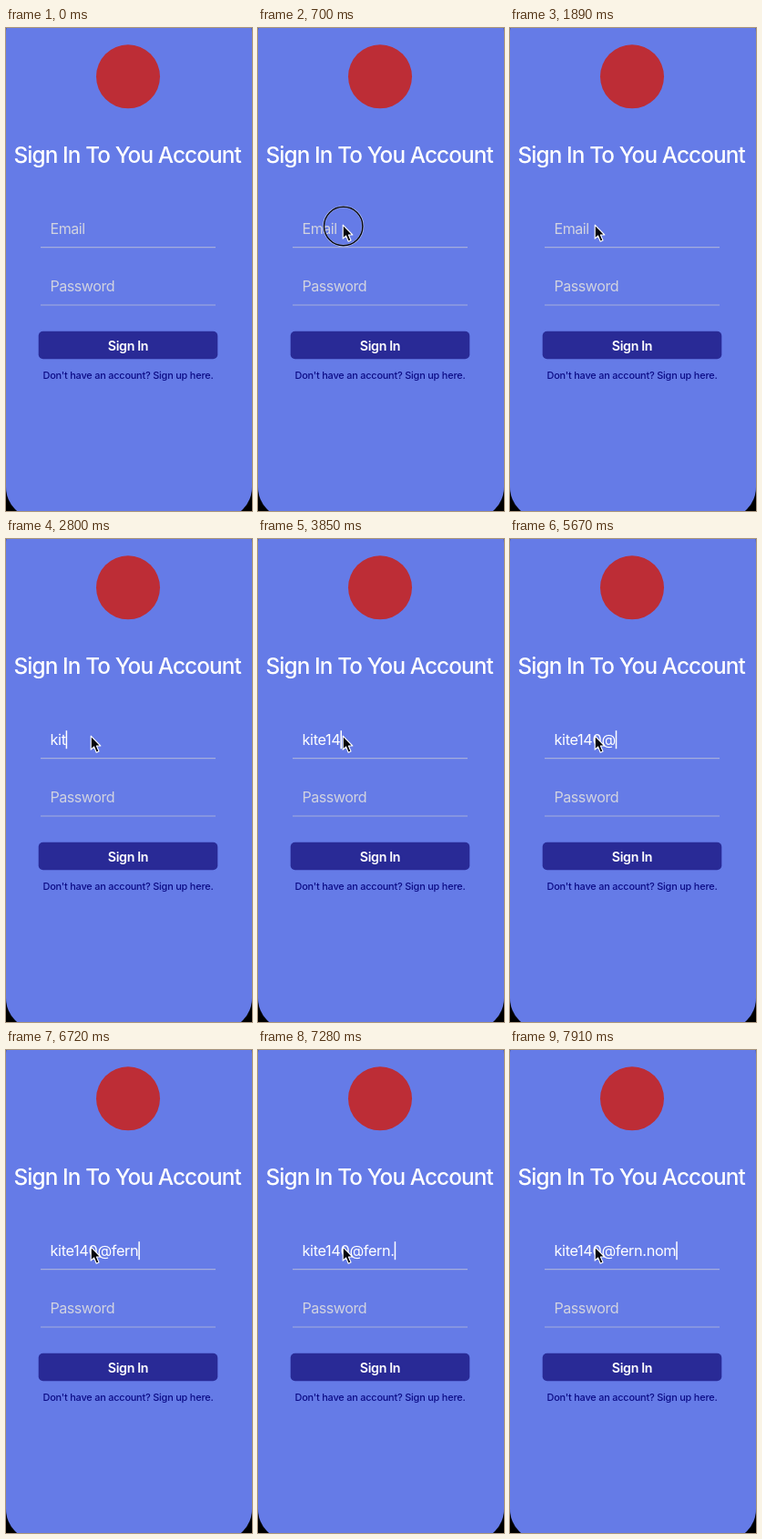
An HTML page for the animation above (8 s loop, 270 px wide and 530 px high).

```html
<!DOCTYPE html>
<html lang="en">
<head>
<meta charset="utf-8">
<title>Sign in</title>
<style>
  html, body { margin: 0; width: 100%; height: 100%; overflow: hidden; background: #000; }
  svg { display: block; width: 270px; height: 530px; }
  text { font-family: Inter, Roboto, sans-serif; fill: #fff; letter-spacing: -.022em; }
  .mid { text-anchor: middle; }
  .title { font-size: 24.3px; font-weight: 500; letter-spacing: -.036em; }
  .field { font-size: 16.3px; }
  .hint { font-size: 16.1px; fill: #d1d3e0; letter-spacing: -.03em; }
  .button { font-size: 14.2px; font-weight: 600; }
  .link { font-size: 10.9px; font-weight: 500; fill: #0c0c86; letter-spacing: -.018em; }
</style>
</head>
<body>
<svg viewBox="0 0 270 530">
  <rect y="-30" width="270" height="568" rx="34" fill="#657be7"/>
  <circle cx="134" cy="53.3" r="35" fill="#bd2d36"/>
  <text class="mid title" x="133.2" y="147.8">Sign In To You Account</text>

  <text class="hint" id="hint" x="48.5" y="226">Email</text>
  <text class="field" id="typed" x="48.5" y="226"></text>
  <rect id="caret" y="210.2" width="1.5" height="20" fill="#fff"/>
  <text class="hint" x="48.5" y="289.2">Password</text>
  <path d="M38 240.7H230M38 304H230" stroke="#a5addc" stroke-width="1.2"/>

  <rect x="35.7" y="332.7" width="196.6" height="30.6" rx="5" fill="#292a96"/>
  <text class="mid button" x="134" y="353.5">Sign In</text>
  <text class="mid link" x="134" y="384.7">Don't have an account? Sign up here.</text>

  <g id="ring" fill="none">
    <circle cx="93.7" cy="217.5" r="21.4" stroke="#fff" stroke-opacity=".55" stroke-width="2.4"/>
    <circle cx="93.7" cy="217.5" r="21.2" stroke="#080a14" stroke-width="1.5"/>
  </g>
  <path id="pointer" d="M0 0V15L3.4 11.8 6 18 8.8 16.8 6.2 10.8H10.6Z"
        fill="#05060c" stroke="#fff" stroke-width="1.1" stroke-linejoin="round"/>
</svg>
<script>
const LOOP = 8000, ENTER = 70, ARRIVE = 540, FOCUS = 1050, LEFT = 48.5;
const address = 'kite140@fern.nom';
const keyTimes = [2170, 2380, 2660, 2870, 3360, 3710, 4200, 5250,
                  5810, 5950, 6090, 6300, 7210, 7420, 7630, 7840];
const [hint, typed, caret, ring, pointer] =
  ['hint', 'typed', 'caret', 'ring', 'pointer'].map(id => document.getElementById(id));

const clamp = v => Math.max(0, Math.min(1, v));
const mix = (a, b, k) => a + (b - a) * k;

// Solid after each key press, then a soft blink once a second.
function caretAlpha(t, lastKey) {
  const age = t - lastKey;
  if (age < 0) return 0;
  if (age < 560) return 1;
  const p = (age - 560) % 1000;
  return clamp(Math.max(1 - p / 140, (p - 430) / 130));
}

function draw(t) {
  const count = keyTimes.filter(k => k <= t).length;
  const text = address.slice(0, count);
  if (typed.textContent !== text) typed.textContent = text;
  hint.style.opacity = count ? 0 : 1;

  const width = count ? typed.getComputedTextLength() : -1;
  caret.setAttribute('x', LEFT + width);
  caret.style.opacity = caretAlpha(t, count ? keyTimes[count - 1] : FOCUS);

  const k = 1 - (1 - clamp((t - ENTER) / (ARRIVE - ENTER))) ** 2;
  pointer.setAttribute('transform', `translate(${mix(255, 93.2, k)} ${mix(520, 216.2, k)})`);
  pointer.style.opacity = t < ENTER ? 0 : 1;
  ring.style.opacity = t < 700 ? 0 : clamp((910 - t) / 90);
}

function tick() {
  draw(performance.now() % LOOP);
  requestAnimationFrame(tick);
}
tick();
</script>
</body>
</html>
```
